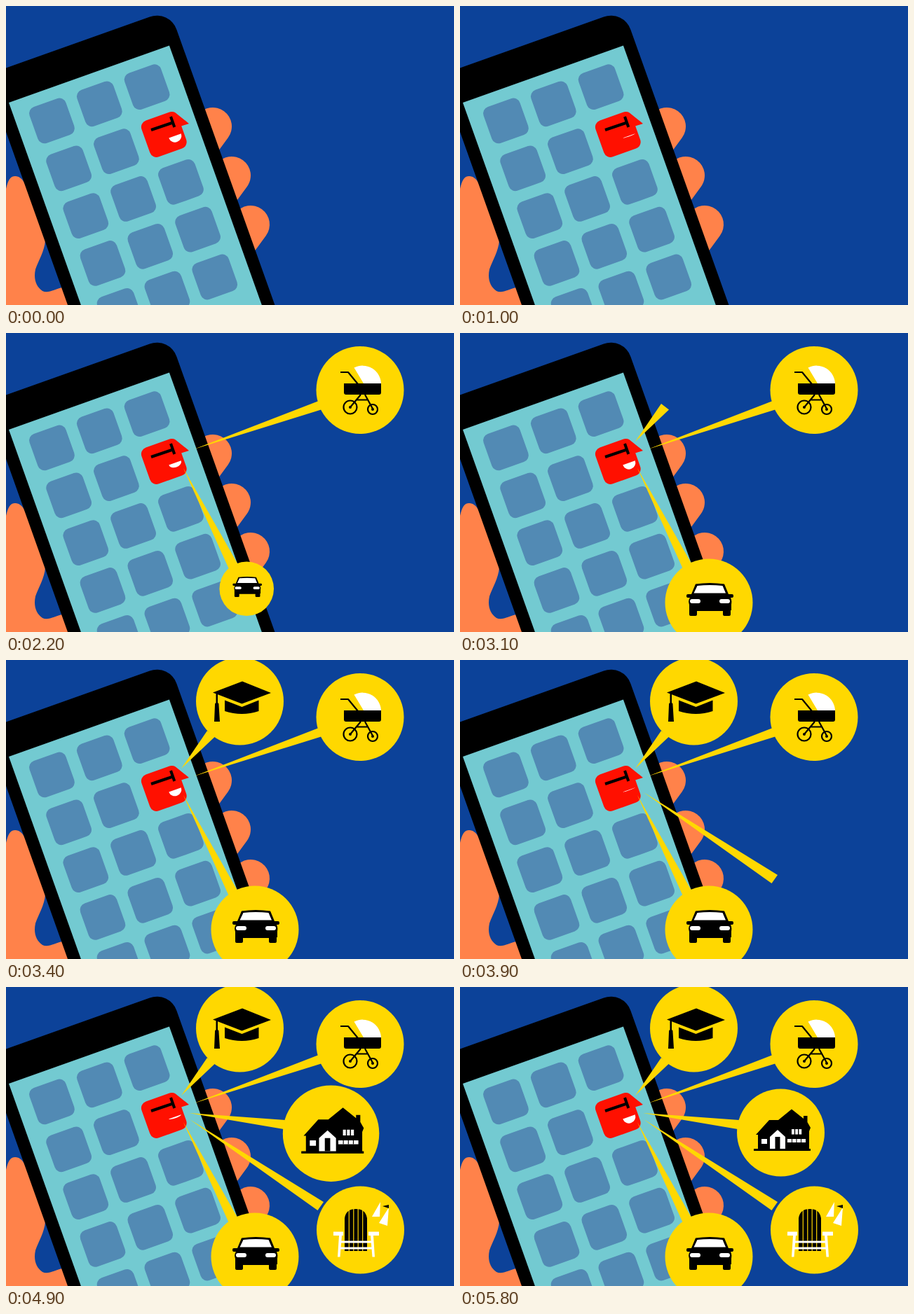
These frames come from a looping animation (639x427 px, 8000 ms). An HTML page:

```html
<!DOCTYPE html>
<html lang="en">
<head>
<meta charset="utf-8">
<title>Talking app</title>
<style>
  html, body { margin: 0; width: 100%; height: 100%; overflow: hidden; background: #0c4299; }
  svg { display: block; width: 100vw; height: 100vh; }
  .y { fill: #ffd800; }
  .w { fill: #fff; }
  .line { fill: none; stroke: #000; stroke-width: 2.2; stroke-linejoin: round; }
  .finger { stroke: #ff824a; stroke-width: 54; stroke-linecap: round; }
  .slit { stroke: #ffd800; stroke-width: 1.2; }
</style>
</head>
<body>
<svg viewBox="0 0 639 427">
  <rect width="639" height="427" fill="#0c4299"/>

  <!-- hand -->
  <path fill="#ff824a" d="M0 261C3 249 6 243 13 243C19 243 23 247 26 252L62 325L56 335C55 350 46 364 42 376C39 390 43 401 52 407C60 411 70 404 84 401L100 427H0Z"/>
  <g class="finger">
    <path d="M295 172L265 213"/>
    <path d="M322 242L292 283"/>
    <path d="M349 312L319 353"/>
  </g>

  <!-- phone -->
  <g transform="translate(4 138) rotate(-19.6)">
    <rect x="-17.8" y="-48" width="278.3" height="600" rx="30"/>
    <rect width="243" height="480" fill="#73cad1"/>
    <g id="apps"></g>
  </g>

  <!-- face -->
  <path fill="#ff1000" d="M236 151.500Q240 150.500 243 153.500L261 168L250 171.500Z"/>
  <path d="M207 177L238 166.500M235 158L240.300 173" fill="none" stroke="#000" stroke-width="4"/>
  <path id="mouth" class="w" transform="translate(241 185.300) rotate(-19.6)"/>

  <g id="beams" class="y"></g>

  <g id="pram">
    <circle class="y" cx="505" cy="81.500" r="62.500"/>
    <path class="w" d="M496.500 49.500A26.500 26.500 0 0 1 535 72H510Z"/>
    <path d="M482 72H535V85Q535 88 532 88H485Q482 88 482 85Z"/>
    <g class="line">
      <path d="M477 56H488L502 73M506 88L491 106M512 88L523 108M500 95.500H517"/>
      <circle cx="491" cy="106" r="9.500"/>
      <circle cx="523" cy="109" r="7"/>
    </g>
    <circle cx="491" cy="106" r="2"/>
    <circle cx="523" cy="109" r="2"/>
  </g>

  <g id="car">
    <circle class="y" cx="355" cy="385" r="62.500"/>
    <path d="M336 358.500Q356 355.500 377 358.500L383 373H388Q390 373 390 375V376Q390 378 387 378H386Q388 382 387 388V396H386V402Q386 404 384 404H377Q375 404 375 402V397H338V402Q338 404 336 404H329Q327 404 327 402V396V388Q325 382 328 378H326Q323 378 323 376V375Q323 373 325 373H330Z"/>
    <path class="w" d="M338.500 361Q356 359 374.500 361L379 371.500H333.500Z"/>
    <rect class="w" x="328" y="380" width="15" height="6" rx="3"/>
    <rect class="w" x="370" y="380" width="15" height="6" rx="3"/>
  </g>

  <g id="cap">
    <circle class="y" cx="333.500" cy="59" r="62.500"/>
    <path d="M295 46.500L337 30.500L378 47L336.500 62.500Z"/>
    <path d="M312 57.500L336.500 67L360.500 57.500V73Q336.500 81 312 73Z"/>
    <path d="M299.500 47H302V61Q304 62 303.500 64L305 88H297L298 64Q297.500 62 299.500 61Z"/>
  </g>

  <g id="chair">
    <circle class="y" cx="505.500" cy="347" r="62.500"/>
    <path d="M483 377V330Q485 317 499 317Q513 317 515 330V377Z"/>
    <path class="slit" d="M489.300 318V377M495.800 316V377M502.200 316V377M508.700 318V377"/>
    <g class="w">
      <path d="M467 349.500H481V355H479L476.500 385.500H473L475 355H467Z"/>
      <path d="M532 349.500H517V355H520L522.500 385.500H526L524 355H532Z"/>
      <path d="M475 362.500H524V365.500H475ZM474.500 371.500H525V374.500H474.500Z"/>
      <path d="M534 307L533 328H522Z"/>
      <path d="M546 315L544 341L532 337Z"/>
    </g>
    <path d="M546 311V316L537 313Z"/>
  </g>

  <g id="house">
    <circle class="y" cx="457.500" cy="208" r="62.500"/>
    <path d="M419 231H425V211H422L441 190H454L473 174.500L490 188V184H495.500V193L500 201L498 206V231H500V234H419Z"/>
    <g class="w">
      <path d="M442 231V214L453 204L464 214V231Z"/>
      <rect x="430" y="217" width="8" height="7"/>
      <path d="M473 203H476.800V210.500H473ZM478.200 203H482V210.500H478.200ZM483.400 203H487.200V210.500H483.400Z"/>
      <rect x="467" y="217" width="26" height="5"/>
    </g>
    <rect x="449.500" y="214" width="7" height="17"/>
    <path d="M473.500 217V222M480 217V222M486.500 217V222" stroke="#000"/>
  </g>
</svg>
<script>
const LOOP = 8000, STEP = 100, GROW = 100;
const $ = id => document.getElementById(id);

function add(parent, tag, attrs) {
  const el = document.createElementNS('http://www.w3.org/2000/svg', tag);
  for (const k in attrs) el.setAttribute(k, attrs[k]);
  return parent.appendChild(el);
}

for (let row = 0; row < 5; row++)
  for (let col = 0; col < 3; col++)
    add($('apps'), 'rect', {
      x: 21.7 + col * 72, y: 17.6 + row * 72, width: 55, height: 55, rx: 10,
      fill: row === 1 && col === 2 ? '#ff1000' : '#528ab4'
    });

// id, time the beam is fully out, beam tip, two base corners
const bubbles = [
  ['pram', 1259, [268, 166], [446, 97], [451, 109]],
  ['car', 2119, [253, 193], [318, 337], [330, 329]],
  ['cap', 3100, [250, 155], [287, 101], [298, 109.5]],
  ['chair', 3900, [262, 189], [444.5, 319], [453, 307]],
  ['house', 4718, [261, 180], [396, 203], [398, 190]]
].map(([id, end, tip, a, b]) => ({
  el: $(id), end, tip,
  base: [(a[0] + b[0]) / 2, (a[1] + b[1]) / 2],
  beam: add($('beams'), 'polygon', { points: [tip, a, b].join(' ') })
}));

// bubble size after its beam is out: [ms, scale]
const pop = [[0, 0], [141, 1.08], [165, 1.1], [182, 1.1], [200, 1.045], [240, 1]];

function popScale(x) {
  if (x <= 0) return 0;
  const i = pop.findIndex(p => p[0] > x);
  if (i < 0) return 1;
  const [x0, s0] = pop[i - 1], [x1, s1] = pop[i];
  return s0 + (s1 - s0) * (x - x0) / (x1 - x0);
}

function scaleAt(el, [x, y], s) {
  el.setAttribute('visibility', s > 0 ? 'visible' : 'hidden');
  el.setAttribute('transform', `translate(${x} ${y}) scale(${s}) translate(${-x} ${-y})`);
}

function mouthOpen(t) {
  if (t < 400 || t >= 5800) return 1;
  return 0.54 + 0.46 * Math.cos((t - 3100) / 320 * 2 * Math.PI);
}

function draw(now) {
  const t = Math.floor(now % LOOP / STEP) * STEP;
  for (const { el, end, tip, base, beam } of bubbles) {
    scaleAt(beam, tip, Math.min(1, Math.max(0, 1 - (end - t) / GROW)));
    scaleAt(el, base, popScale(t - end));
  }
  $('mouth').setAttribute('d', `M-9.300 0A9.300 ${9.3 * mouthOpen(t)} 0 0 0 9.300 0Z`);
  requestAnimationFrame(draw);
}
draw(performance.now());
</script>
</body>
</html>
```
